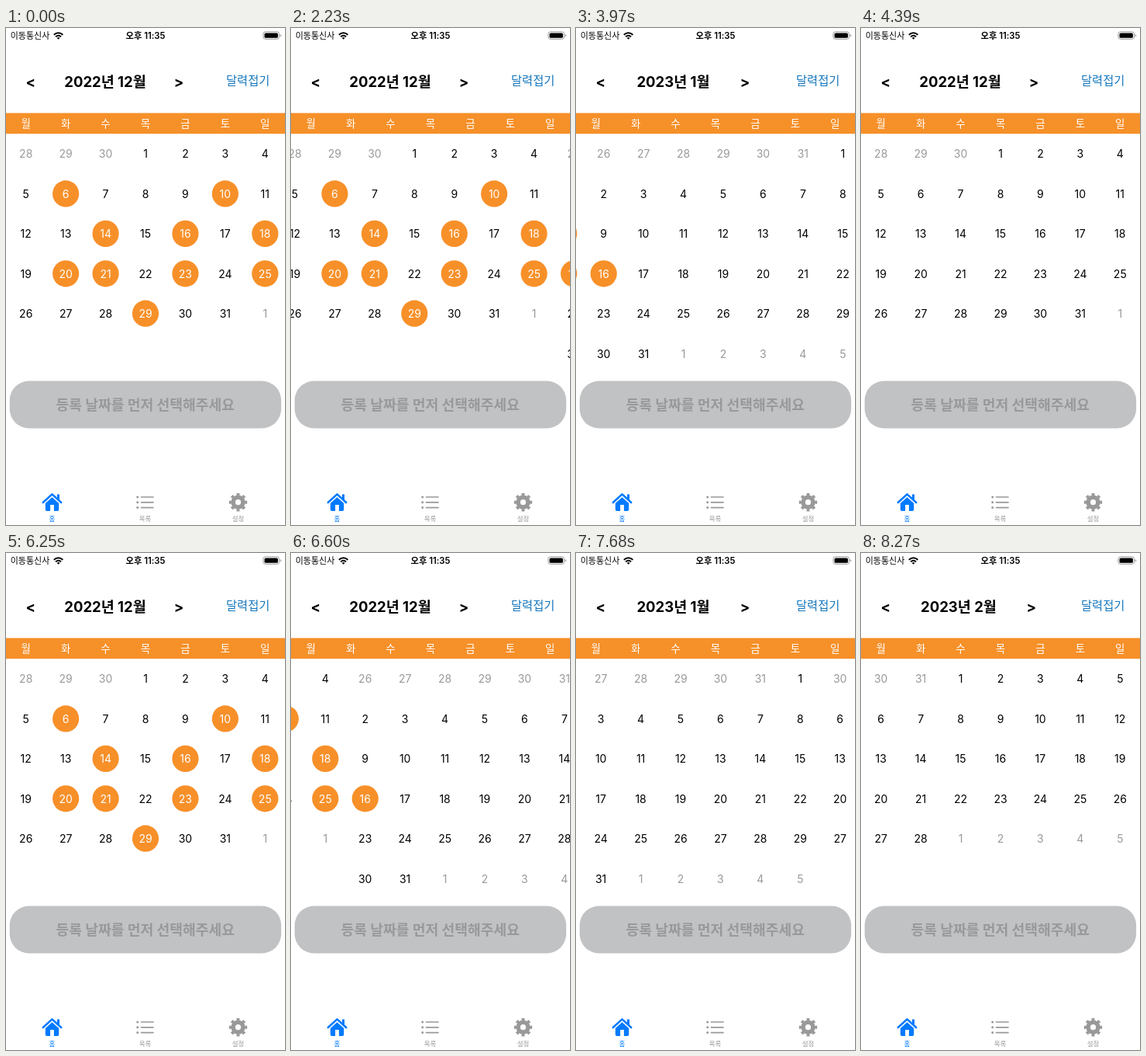
These frames come from a looping animation (360x640 px, 8300 ms). An HTML page:

```html
<!DOCTYPE html>
<html lang="ko">
<head>
<meta charset="utf-8">
<style>
  html, body { margin: 0; width: 100%; height: 100%; overflow: hidden; background: #fff; }
  svg { display: block; width: 360px; height: 640px; }
  text { font-family: Inter, "Noto Sans CJK KR", "Noto Sans CJK", sans-serif; text-anchor: middle; }
  .title { font-size: 18.5px; font-weight: 700; }
  .day { font-size: 14px; }
  .faded { fill: #999; }
  .week { font-size: 13.5px; font-weight: 500; fill: #fff; }
  .tab { font-size: 8.5px; font-weight: 500; fill: #999; }
  .dot { fill: #f79029; visibility: hidden; }
  .marked .dot { visibility: visible; }
  .marked .busy { fill: #fff; }
</style>
</head>
<body>
<svg viewBox="0 0 360 640">
  <defs><clipPath id="grid"><rect y="137" width="360" height="300"/></clipPath></defs>

  <!-- status bar -->
  <text x="31" y="14" font-size="11">이동통신사</text>
  <g fill="none" stroke="#000" stroke-width="2">
    <path d="M61.8 8.7q5.8-5 11.6 0M64.1 11.2q3.5-2.9 7 0"/>
  </g>
  <path d="M65.6 12.7q2-1.5 4 0l-2 2.1z"/>
  <text x="180" y="14" font-size="11.3" font-weight="600">오후 11:35</text>
  <rect x="331.9" y="4.9" width="20.6" height="9.4" rx="2.8" fill="none" stroke="#999"/>
  <rect x="333.5" y="6.4" width="17.4" height="6.4" rx="1.6"/>
  <path d="M353.8 8v3.4q1.5-.5 1.5-1.7t-1.5-1.7z" fill="#999"/>

  <!-- header -->
  <text class="title" x="31.7" y="75.8">&lt;</text>
  <text class="title" id="title" y="75.8"></text>
  <text class="title" id="next" y="75.8">&gt;</text>
  <text x="312.2" y="73" font-size="15.3" font-weight="500" fill="#1778bd">달력접기</text>
  <rect y="109.5" width="360" height="26.7" fill="#f69029"/>
  <g id="week"></g>
  <g clip-path="url(#grid)"><g id="pages"></g></g>

  <!-- button -->
  <rect x="4.7" y="454.5" width="350.4" height="61" rx="25" fill="#c0c2c4"/>
  <text x="179.7" y="491.8" font-size="18.2" font-weight="700" fill="#98999b">등록 날짜를 먼저 선택해주세요</text>

  <!-- tab bar -->
  <g fill="#007aff">
    <path d="M66 600.5h3v7h-3z"/>
    <path d="M47.8 611l11.7-10.6L71.2 611" fill="none" stroke="#007aff" stroke-width="2.6" stroke-linecap="round" stroke-linejoin="round"/>
    <path d="M50.8 612l8.7-7.8 8.7 7.8v8q0 2-2 2H61.900v-8h-4.800v8H52.800q-2 0-2-2z"/>
  </g>
  <g stroke="#999" fill="none" stroke-linecap="round">
    <path d="M174.500 604h15.500M174.500 610.800h15.500M174.500 617.600h15.500" stroke-width="1.700"/>
    <path d="M169.700 604h.01M169.700 610.800h.01M169.700 617.600h.01" stroke-width="3"/>
  </g>
  <g stroke="#999" fill="none">
    <circle cx="299.500" cy="610.700" r="6.400" stroke-width="5.600"/>
    <circle cx="299.500" cy="610.700" r="9.800" stroke-width="3.800" pathLength="16" stroke-dasharray="1 1" stroke-dashoffset=".5"/>
  </g>
  <text class="tab" x="59.500" y="635.200" style="fill:#007aff">홈</text>
  <text class="tab" x="179.500" y="635.200">목록</text>
  <text class="tab" x="299.500" y="635.200">설정</text>
</svg>
<script>
const LOOP = 8300, WIDTH = 360, STEP = WIDTH / 7;
const $ = id => document.getElementById(id);
const colX = col => STEP * (col + 0.5);

const months = [
  { year: 2022, month: 12, weeks: 5, titleX: 128, nextX: 223, busy: [6, 10, 14, 16, 18, 20, 21, 23, 25, 29] },
  { year: 2023, month: 1, weeks: 6, titleX: 125.5, nextX: 218, busy: [16] },
  { year: 2023, month: 2, weeks: 5, titleX: 126, nextX: 219.7, busy: [] },
];

// [time, scroll position, titled month, marks visible]
const steps = [
  [0, 0, 0, true],
  [2230, 20.7, 0, true], [2340, 190, 0, true], [2440, 337, 0, true], [2750, 360, 1, false],
  [3970, 350, 1, true], [4080, 170, 1, true], [4190, 4, 1, true], [4390, 0, 0, false],
  [6250, 0, 0, true], [6360, 40, 0, true], [6480, 170, 0, true], [6600, 290, 0, true], [6720, 344, 0, true],
  [6950, 360, 1, false],
  [7570, 362, 1, true], [7680, 405, 1, true], [7780, 525, 1, true], [7890, 640, 1, true], [8000, 701, 1, true],
  [8270, 720, 2, false],
];

function monthPage({ year, month, weeks, busy }, index) {
  const lead = (new Date(year, month - 1, 1).getDay() + 6) % 7;
  let cells = "";
  for (let i = 0; i < weeks * 7; i++) {
    const date = new Date(year, month - 1, 1 + i - lead);
    const day = date.getDate(), inside = date.getMonth() === month - 1;
    const isBusy = inside && busy.includes(day);
    const x = index * WIDTH + colX(i % 7), y = 162.2 + STEP * Math.floor(i / 7);
    if (isBusy) cells += `<circle class="dot" cx="${x}" cy="${y - 0.2}" r="17.1"/>`;
    cells += `<text class="day ${inside ? "" : "faded"} ${isBusy ? "busy" : ""}" x="${x}" y="${y + 5.2}">${day}</text>`;
  }
  return cells;
}

$("week").innerHTML = [..."월화수목금토일"]
  .map((name, i) => `<text class="week" x="${colX(i)}" y="128">${name}</text>`).join("");
$("pages").innerHTML = months.map(monthPage).join("");

function draw() {
  const time = performance.now() % LOOP;
  const [, scroll, current, marked] = steps.findLast(step => step[0] <= time);
  const { year, month, titleX, nextX } = months[current];
  $("pages").setAttribute("transform", `translate(${-scroll})`);
  $("pages").setAttribute("class", marked ? "marked" : "");
  $("title").textContent = `${year}년 ${month}월`;
  $("title").setAttribute("x", titleX);
  $("next").setAttribute("x", nextX);
  requestAnimationFrame(draw);
}
draw();
</script>
</body>
</html>
```
